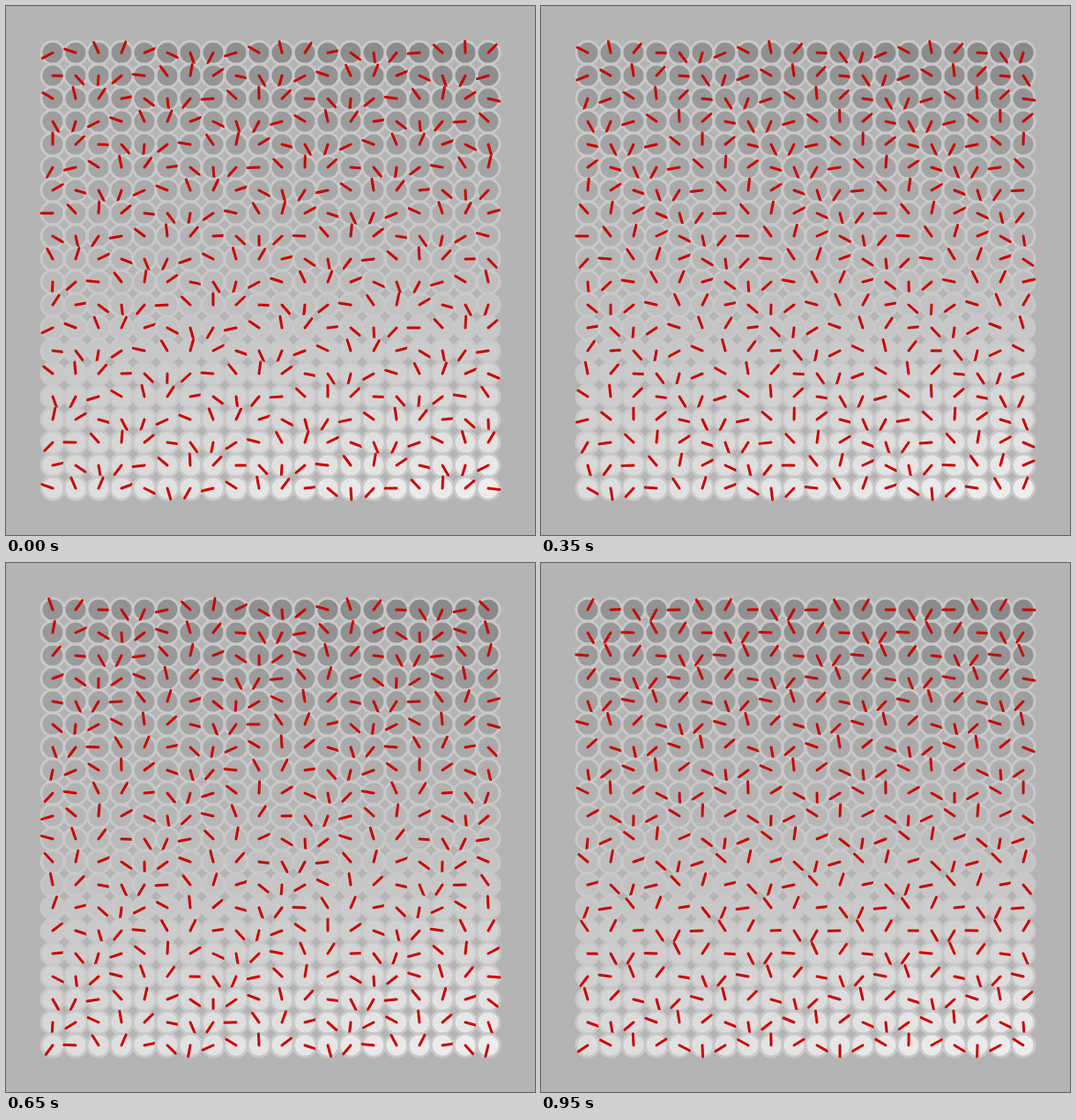
These frames come from a looping animation (600 by 600 pixels, 1 s). An HTML page with a canvas:

```html
<!DOCTYPE html>
<html lang="en">
<head>
<meta charset="utf-8">
<title>Spinning hands</title>
<style>
  html, body { margin: 0; height: 100%; overflow: hidden; background: #b4b4b4; }
  canvas { display: block; width: 600px; height: 600px; }
</style>
</head>
<body>
<canvas id="stage" width="600" height="600"></canvas>
<script>
  const ctx = document.getElementById('stage').getContext('2d');
  const N = 20, CELL = 26, START = 53, R = 13;
  const STEP = 50, LOOP = 1000;
  const BEND = 0.00025; // slight curvature of the phase along the cells

  // [step, heading of the first hand, phase shift from cell to cell], degrees clockwise from up
  const KEYS = [
    [0, 242, 46.452],
    [4, 278, 49.675],
    [7, 297, 51.542],
    [9, 312, 52.997],
    [11, 326, 54.234],
    [15, 355, 56.712],
    [19, 388, 60.137]
  ];

  const mix = (a, b, u) => a + (b - a) * u;

  function phase(step) {
    let i = 0;
    while (i < KEYS.length - 2 && step > KEYS[i + 1][0]) i++;
    const a = KEYS[i], b = KEYS[i + 1];
    const u = (step - a[0]) / (b[0] - a[0]);
    return [mix(a[1], b[1], u), mix(a[2], b[2], u)];
  }

  function shade(col, row) {
    const v = row / (N - 1), u = col / (N - 1);
    const g = Math.round(mix(mix(148, 220, v), mix(137, 237, v), u));
    return `rgb(${g},${g},${g})`;
  }

  function drawCell(col, row, deg) {
    const x = START + col * CELL, y = START + row * CELL;
    const a = deg * Math.PI / 180;
    ctx.beginPath();
    ctx.arc(x, y, R, 0, Math.PI * 2);
    ctx.fillStyle = shade(col, row);
    ctx.fill();
    ctx.strokeStyle = '#c8c8c8';
    ctx.stroke();

    ctx.beginPath();
    ctx.moveTo(x, y);
    ctx.lineTo(x + R * Math.sin(a), y - R * Math.cos(a));
    ctx.strokeStyle = '#c80000';
    ctx.stroke();
  }

  function draw(step) {
    const [first, shift] = phase(step);
    ctx.fillStyle = '#b4b4b4';
    ctx.fillRect(0, 0, 600, 600);
    ctx.lineWidth = 3;
    ctx.lineCap = 'round';
    for (let k = 0; k < N * N; k++) {
      drawCell(k % N, Math.floor(k / N), first + shift * k + BEND * k * k);
    }
  }

  const t0 = performance.now();
  let last = -1;
  function tick() {
    const step = Math.floor(((performance.now() - t0) % LOOP) / STEP);
    if (step !== last) draw(last = step);
    requestAnimationFrame(tick);
  }
  tick();
</script>
</body>
</html>
```
